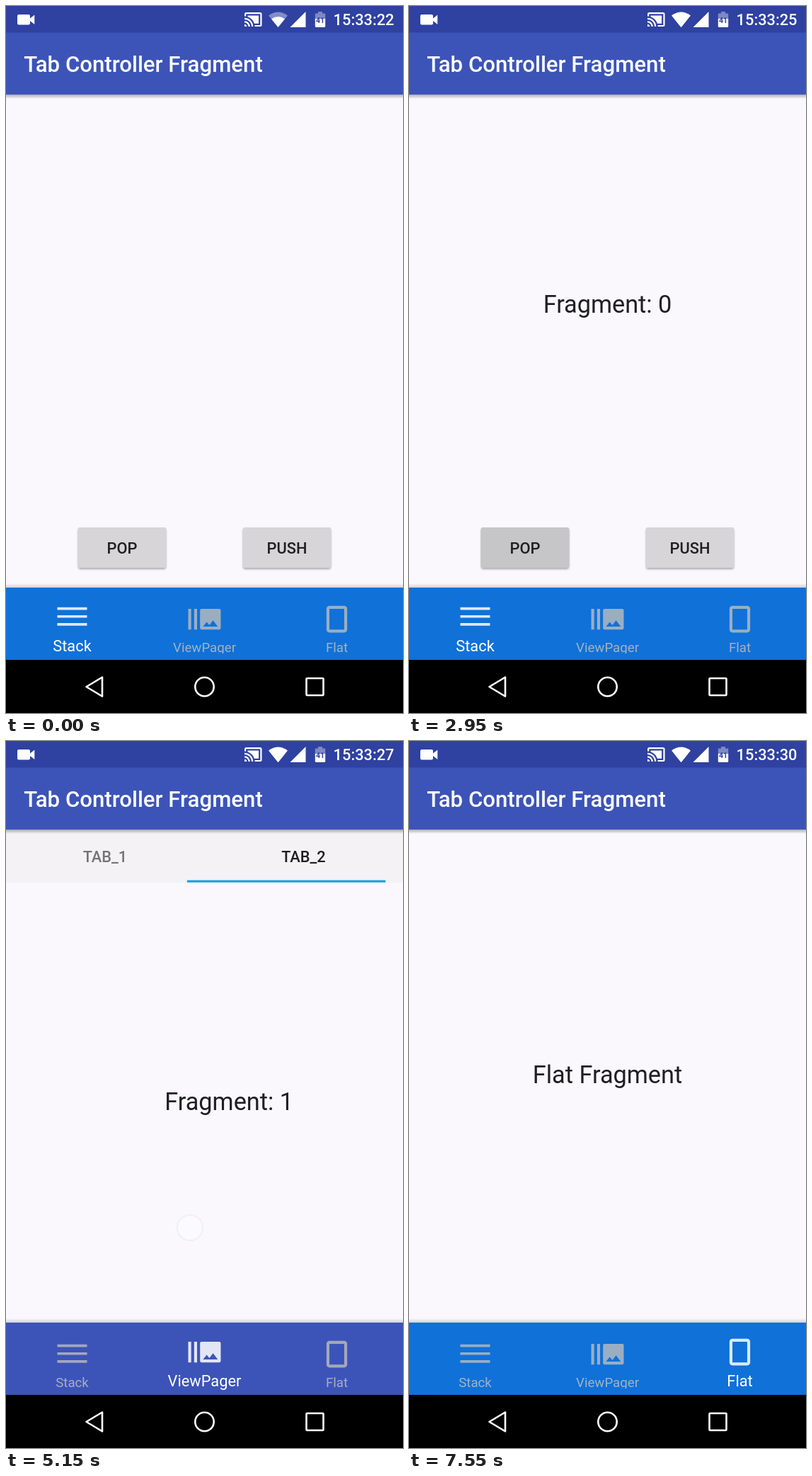
Animation of 561x998 px, one loop 8000 ms. Source, as an HTML page:

```html
<!DOCTYPE html>
<html lang="en">
<head>
<meta charset="utf-8">
<title>Tab Controller Fragment</title>
<style>
  html, body { margin: 0; width: 100%; height: 100%; overflow: hidden; background: #faf8fc; }
  svg { display: block; width: 100vw; height: 100vh; font-family: Roboto, sans-serif; }
  .mid { text-anchor: middle; }
  .caps { font-size: 21.8px; font-weight: 500; text-anchor: middle; }
  .big { font-size: 34.28px; text-anchor: middle; }
  .ink { fill: #1f1e21; }
  .line { fill: none; stroke: #fff; stroke-width: 2.6; }
  .button { fill: #d7d5d8; }
  .shade { fill: #000; opacity: 0; }
</style>
</head>
<body>
<svg viewBox="0 0 561 998" preserveAspectRatio="none">
  <defs>
    <linearGradient id="down" x2="0" y2="1">
      <stop stop-color="#000" stop-opacity=".3"/><stop offset="1" stop-color="#000" stop-opacity="0"/>
    </linearGradient>
    <linearGradient id="up" x2="0" y1="1" y2="0">
      <stop stop-color="#000" stop-opacity=".16"/><stop offset="1" stop-color="#000" stop-opacity="0"/>
    </linearGradient>
    <filter id="blur" x="-10%" y="-20%" width="120%" height="140%"><feGaussianBlur stdDeviation="1.6"/></filter>
    <clipPath id="popClip"><rect x="101.500" y="736" width="125" height="57" rx="3"/></clipPath>
    <clipPath id="pushClip"><rect x="334.500" y="736" width="125" height="57" rx="3"/></clipPath>
    <clipPath id="tabClip"><rect x="280.500" y="125" width="280.500" height="75"/></clipPath>
    <clipPath id="barClip"><rect y="821" width="561" height="102"/></clipPath>
    <clipPath id="labelClip"><rect id="labelBox" y="880" width="561" height="34"/></clipPath>
  </defs>

  <rect width="561" height="998" fill="#faf8fc"/>

  <g id="stackPage">
    <text id="stackText" class="big ink" x="280.5" y="433"></text>
    <g opacity=".32" filter="url(#blur)">
      <rect x="102" y="738" width="124" height="57" rx="3"/>
      <rect x="335" y="738" width="124" height="57" rx="3"/>
    </g>
    <g clip-path="url(#popClip)">
      <rect class="button" x="101" y="736" width="126" height="57"/>
      <rect id="popShade" class="shade" x="101" y="736" width="126" height="57"/>
      <circle id="popWave" class="shade" cx="166" cy="768"/>
    </g>
    <g clip-path="url(#pushClip)">
      <rect class="button" x="334" y="736" width="126" height="57"/>
      <rect id="pushShade" class="shade" x="334" y="736" width="126" height="57"/>
      <circle id="pushWave" class="shade" cx="392" cy="770"/>
    </g>
    <text class="caps ink" x="164" y="772.5">POP</text>
    <text class="caps ink" x="397" y="772.5">PUSH</text>
  </g>

  <g id="pagerPage">
    <g id="pages">
      <text class="big ink" x="280.5" y="520.5">Fragment: 0</text>
      <text class="big ink" x="841.5" y="520.5">Fragment: 1</text>
    </g>
    <rect y="125" width="561" height="75" fill="#f4f2f5"/>
    <g clip-path="url(#tabClip)">
      <rect id="tabShade" class="shade" x="280" y="125" width="281" height="75"/>
      <circle id="tabWave" class="shade" cx="425" cy="164"/>
    </g>
    <text id="tab1" class="caps" x="140" y="170.5">TAB_1</text>
    <text id="tab2" class="caps" x="420.5" y="170.5">TAB_2</text>
    <rect id="marker" y="196.500" width="280.500" height="3.100" fill="#10a3dc"/>
  </g>

  <text id="flatPage" class="big ink" x="280.5" y="483">Flat Fragment</text>

  <rect y="125" width="561" height="6" fill="url(#down)"/>
  <rect y="37" width="561" height="88" fill="#3c54b8"/>
  <rect width="561" height="37.500" fill="#2f41a1"/>
  <text x="25.300" y="93" font-size="31.200" font-weight="500" fill="#fff">Tab Controller Fragment</text>

  <g fill="#fff">
    <path d="M18 12h14q2 0 2 2v3.500l6.300-5v13.500l-6.300-5v3.500q0 2-2 2h-14q-2 0-2-2v-10.500q0-2 2-2z"/>
    <path transform="translate(335.900 5.700) scale(1.115)" d="M21 3H3c-1.100 0-2 .9-2 2v3h2V5h18v14h-7v2h7c1.100 0 2-.9 2-2V5c0-1.100-.9-2-2-2zM1 18v3h3c0-1.660-1.340-3-3-3zm0-4v2c2.760 0 5 2.240 5 5h2c0-3.870-3.130-7-7-7zm0-4v2c4.970 0 9 4.030 9 9h2c0-6.080-4.930-11-11-11zM19 7H5v1.630c3.960 1.280 7.090 4.410 8.370 8.370H19V7z"/>
    <path id="wifiFull" d="M384.500 30L371 13.500Q384.500 3.500 398 13.500z"/>
    <path d="M384.500 30L375 18.300Q384.500 11.500 394 18.300z"/>
    <path d="M401.500 30H423.500V8z"/>
    <path opacity=".38" d="M441 8h6v2.500h4.200v7.500h-14.400v-7.500h4.200z"/>
    <path d="M436.800 18h14.400v10.500q0 1.500-1.500 1.500h-11.400q-1.500 0-1.500-1.500z"/>
    <text class="mid" x="444" y="23.500" font-size="10.500" font-weight="700" fill="#2f41a1">41</text>
    <text id="clock" x="548.500" y="27.300" font-size="21.800" font-weight="500" text-anchor="end"></text>
  </g>

  <rect y="815" width="561" height="6" fill="url(#up)"/>
  <g clip-path="url(#barClip)">
    <rect id="bar" y="821" width="561" height="102"/>
    <circle id="reveal" cy="862"/>
  </g>
  <g id="icon0"><path d="M72.500 851.700h42v3.700h-42zm0 11.200h42v3.700h-42zm0 11.200h42v3.700h-42z"/></g>
  <g id="icon1"><path transform="translate(255.400 840.500) scale(2.090)" d="M1 5h2v14H1zm4 0h2v14H5zm17 0H10c-.55 0-1 .45-1 1v12c0 .55.45 1 1 1h12c.55 0 1-.45 1-1V6c0-.55-.45-1-1-1zM11 17l2.500-3.150L15.290 16l2.500-3.220L21 17H11z"/></g>
  <g id="icon2"><path transform="translate(442.400 840.500) scale(2.090)" d="M17 3H7c-1.100 0-2 .9-2 2v14c0 1.100.9 2 2 2h10c1.100 0 2-.9 2-2V5c0-1.100-.9-2-2-2zm0 16H7V5h10v14z"/></g>
  <text id="label0" class="mid" x="93.500">Stack</text>
  <g clip-path="url(#labelClip)"><text id="label1" class="mid" x="280.500">ViewPager</text></g>
  <text id="label2" class="mid" x="467.500">Flat</text>

  <rect y="923" width="561" height="75"/>
  <path class="line" stroke-linejoin="round" d="M113.500 961L136 947.500V974.500z"/>
  <circle class="line" cx="280.500" cy="961" r="13.200"/>
  <rect class="line" x="424.500" y="949" width="24" height="24" rx="1"/>

  <circle id="touch" r="18" fill="#fff" fill-opacity=".5" stroke="#c3cad6" stroke-opacity=".5" stroke-width="2"/>
</svg>

<script>
const LOOP = 8000, W = 561;
const BLUE = '#1071d8', INDIGO = '#3c54b8';
const PRESS = 90;
const pushes = [950, 1250, 1550, 1850];
const pops = [2230, 2480, 2730];
const TO_PAGER = 3760, TO_FLAT = 7280;
const LEFT_UP = 5070, RIGHT_UP = 5720, TAB_UP = 6500;

const el = {};
for (const node of document.querySelectorAll('[id]')) el[node.id] = node;
const set = (id, attrs) => {
  for (const k in attrs) el[id].setAttribute(k, attrs[k]);
};
const show = (id, on) => set(id, { visibility: on ? 'visible' : 'hidden' });

const clamp = x => Math.min(1, Math.max(0, x));
const part = (t, start, length) => clamp((t - start) / length);
const mix = (a, b, p) => a + (b - a) * p;
const smooth = p => 0.5 - 0.5 * Math.cos(Math.PI * p);
const settle = p => 1 - (1 - p) ** 5;

// Finger paths: start, end, from x/y, to x/y
const touches = [
  ...pushes.map(t => [t, t + PRESS, 392, 770, 392, 770]),
  ...pops.map(t => [t, t + PRESS, 166, 768, 166, 768]),
  [3700, 3840, 267, 870, 267, 870],
  [4950, LEFT_UP, 480, 692, 260, 687],
  [5500, RIGHT_UP, 105, 657, 342, 655],
  [6370, TAB_UP, 425, 164, 425, 164],
  [7200, 7340, 468, 868, 468, 868]
];

function drawTouch(t) {
  const hit = touches.filter(f => t >= f[0]).pop();
  if (!hit) return set('touch', { opacity: 0 });
  const [start, end, x0, y0, x1, y1] = hit;
  const p = part(t, start, end - start) ** 1.4;
  set('touch', { cx: mix(x0, x1, p), cy: mix(y0, y1, p), opacity: 1 - part(t, end, 130) });
}

function drawRipple(name, taps, t) {
  const start = taps.filter(x => t >= x).pop();
  const dt = start === undefined ? LOOP : t - start;
  const level = part(dt, 0, 60) * (1 - part(dt, 150, 170));
  set(name + 'Shade', { style: `opacity:${0.1 * level}` });
  set(name + 'Wave', { r: 72 * Math.sin(part(dt, 0, 260) * Math.PI / 2) * 1.006, style: `opacity:${0.035 * level}` });
}

// Pager position: 0 = first tab, 1 = second tab
function pagerAt(t) {
  if (t < LEFT_UP) return 0.37 * part(t, 4960, LEFT_UP - 4960) ** 1.4;
  if (t < 5500) return mix(0.37, 1, settle(part(t, LEFT_UP, 218)));
  if (t < RIGHT_UP) return 1 - 0.4 * part(t, 5520, RIGHT_UP - 5520) ** 1.4;
  if (t < TAB_UP) return mix(0.6, 0, settle(part(t, RIGHT_UP, 270)));
  return smooth(part(t, TAB_UP, 300));
}

function drawPager(t) {
  const second = (t >= LEFT_UP && t < RIGHT_UP) || t >= TAB_UP;
  set('pages', { transform: `translate(${-W * pagerAt(t)})` });
  set('marker', { x: W / 2 * pagerAt(t - 10) });
  set('tab1', { fill: second ? '#757376' : '#1f1e21' });
  set('tab2', { fill: second ? '#1f1e21' : '#757376' });
  const level = part(t, 6370, 80) * (1 - part(t, 6550, 500));
  set('tabShade', { style: `opacity:${0.045 * level}` });
  set('tabWave', { r: 160 * part(t, 6370, 300), style: `opacity:${0.025 * level}` });
}

function drawStack(t) {
  const done = list => list.filter(x => t >= x + PRESS).length;
  const top = done(pushes) - done(pops) - 1;
  el.stackText.textContent = top < 0 ? '' : `Fragment: ${top}`;
  drawRipple('push', pushes, t);
  drawRipple('pop', pops, t);
}

function drawBar(t) {
  const toPager = smooth(part(t, TO_PAGER, 250));
  const toFlat = smooth(part(t, TO_FLAT, 250));
  const last = t >= TO_FLAT;
  set('bar', { fill: last ? INDIGO : BLUE });
  set('reveal', {
    fill: last ? BLUE : INDIGO,
    cx: last ? 467.5 : 280.5,
    r: last ? 485 * toFlat : 300 * toPager
  });
  [1 - toPager, toPager - toFlat, toFlat].forEach((on, i) => {
    const tone = mix(189, 255, on);
    const color = alpha => `rgba(${tone},${tone},${tone},${alpha})`;
    set('icon' + i, { transform: `translate(0 ${-3 * on})`, fill: color(mix(0.8, 0.85, on)) });
    set('label' + i, { y: mix(912.3, 910.8, on), 'font-size': mix(18.7, 21.8, on), fill: color(mix(0.85, 1, on)) });
    if (i === 1) set('labelBox', { height: mix(34, 38, on) });
  });
}

function draw(t) {
  el.clock.textContent = `15:33:${22 + Math.floor((t + 500) / 1000)}`;
  set('wifiFull', { opacity: t < 2500 ? 0.4 : 1 });
  show('stackPage', t < TO_PAGER);
  show('pagerPage', t >= TO_PAGER && t < TO_FLAT);
  show('flatPage', t >= TO_FLAT);
  drawStack(t);
  drawPager(t);
  drawBar(t);
  drawTouch(t);
}

const begin = performance.now();
function tick() {
  draw((performance.now() - begin) % LOOP);
  requestAnimationFrame(tick);
}
tick();
</script>
</body>
</html>
```
